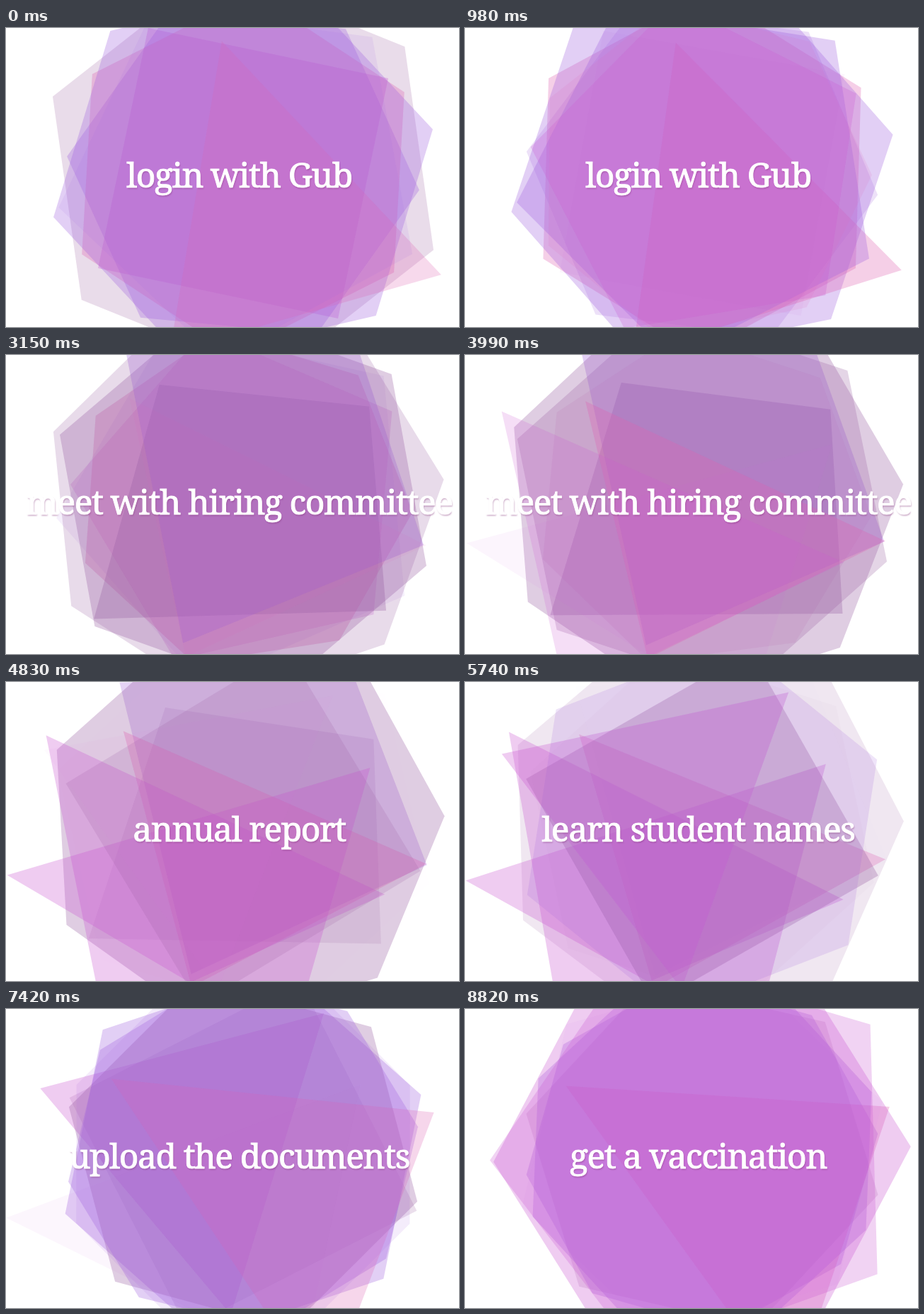
An HTML page with a canvas for the animation above (8.89 s loop, 640x422 px).

```html
<!DOCTYPE html>
<html lang="en">
<head>
<meta charset="utf-8">
<title>To-do polygons</title>
<style>
html, body { margin: 0; width: 100%; height: 100%; overflow: hidden; background: #fff; }
#stage { position: relative; width: 640px; height: 422px; overflow: hidden; contain: strict; }
canvas { display: block; }
#task {
  position: absolute; left: 19px; top: 177px; width: 621px;
  font: 400 48px/60px "Noto Serif", "Liberation Serif", serif;
  letter-spacing: -1.4px; text-align: center; white-space: nowrap;
  color: #fff; -webkit-text-stroke: 1px #fff;
  text-shadow: 1px 2px 2px rgba(130, 50, 120, .4);
}
</style>
</head>
<body>
<div id="stage">
  <canvas width="640" height="422"></canvas>
  <div id="task"></div>
</div>
<script>
const LOOP = 8890, STEP = 70;        // ms
const SPIN = 0.028;                  // radians per second
const FIRST = -1.2, GAP = 0.46;      // seconds: when shapes are at their peak
const HALF_LIFE = 1.9, FADE = 1;     // seconds
const OPACITY = 0.3;
const FIRST_SWAP = 1680, TASK_TIME = 1260; // ms

const PINK = "rgb(220,98,176)", VIOLET = "rgb(160,98,220)";
const PLUM = "rgb(150,90,158)", ORCHID = "rgb(202,88,210)";

const ctx = document.querySelector("canvas").getContext("2d");
const label = document.getElementById("task");

const tasks = [
  "login with Gub", "grade the papers", "meet with hiring committee", "annual report",
  "learn student names", "upload the documents", "get a vaccination"
];

// A regular polygon around the middle of the stage; turn in degrees
function ring(color, sides, turn, radius) {
  const points = Array.from({ length: sides }, (_, k) => {
    const a = (turn + k * 360 / sides) * Math.PI / 180;
    return [335 + radius * Math.cos(a), 205 + radius * Math.sin(a)];
  });
  return { color, points };
}

// An uneven polygon through its corners
const shard = (color, ...points) => ({ color, points });

// One after another, each reaching its peak GAP seconds after the last
const shapes = [
  ring(PLUM, 6, 20, 290),
  ring(ORCHID, 4, -122, 245),
  ring(VIOLET, 6, 5, 250),
  ring(PINK, 6, 33, 255),
  ring(VIOLET, 6, -12, 275),
  shard(PINK, [297, 21], [617, 341], [237, 462]),
  ring(VIOLET, 5, 28, 265),
  ring(ORCHID, 5, -29, 245),
  ring(PINK, 7, 3, 240),
  ring(PLUM, 6, 20, 275),
  shard(PLUM, [218, 41], [514, 74], [536, 362], [123, 371]),
  shard(VIOLET, [165, -5], [496, -5], [592, 264], [255, 409]),
  ring(PLUM, 7, -4, 285),
  shard(PINK, [166, 69], [594, 257], [262, 430]),
  shard(ORCHID, [59, 73], [535, 303], [136, 478]),
  shard(ORCHID, [1, 280], [510, 116], [408, 506]),
  ring(PLUM, 4, 16, 258),
  shard(ORCHID, [50, 107], [453, 10], [312, 432]),
  ring(VIOLET, 6, -19, 265),
  ring(PLUM, 6, 15, 255),
  ring(VIOLET, 8, -8, 250),
  shard(PINK, [144, 106], [601, 140], [458, 550]),
  ring(VIOLET, 8, -20, 255),
  ring(ORCHID, 6, -3, 295),
  ring(ORCHID, 5, 36, 300)
];

const mean = (points, axis) => points.reduce((sum, p) => sum + p[axis], 0) / points.length;

function drawShape({ color, points }, i, t) {
  const age = t - (FIRST + i * GAP);
  const fade = Math.min(1, (HALF_LIFE - Math.abs(age)) / FADE);
  if (fade <= 0) return;
  const cx = mean(points, 0), cy = mean(points, 1);
  const dir = i % 2 ? -1 : 1;
  ctx.save();
  ctx.globalAlpha = OPACITY * fade;
  ctx.fillStyle = color;
  ctx.translate(cx, cy);
  ctx.rotate(dir * SPIN * age);
  ctx.beginPath();
  points.forEach(([x, y]) => ctx.lineTo(x - cx, y - cy));
  ctx.fill();
  ctx.restore();
}

function render(ms) {
  const now = Math.floor((ms % LOOP) / STEP) * STEP;
  ctx.clearRect(0, 0, 640, 422);
  shapes.forEach((s, i) => drawShape(s, i, now / 1000));
  const text = tasks[Math.max(0, Math.floor((now - FIRST_SWAP) / TASK_TIME) + 1)];
  if (label.textContent !== text) label.textContent = text;
}

const begin = performance.now();
function tick() {
  render(Math.max(0, performance.now() - begin));
  requestAnimationFrame(tick);
}
tick();
</script>
</body>
</html>
```
